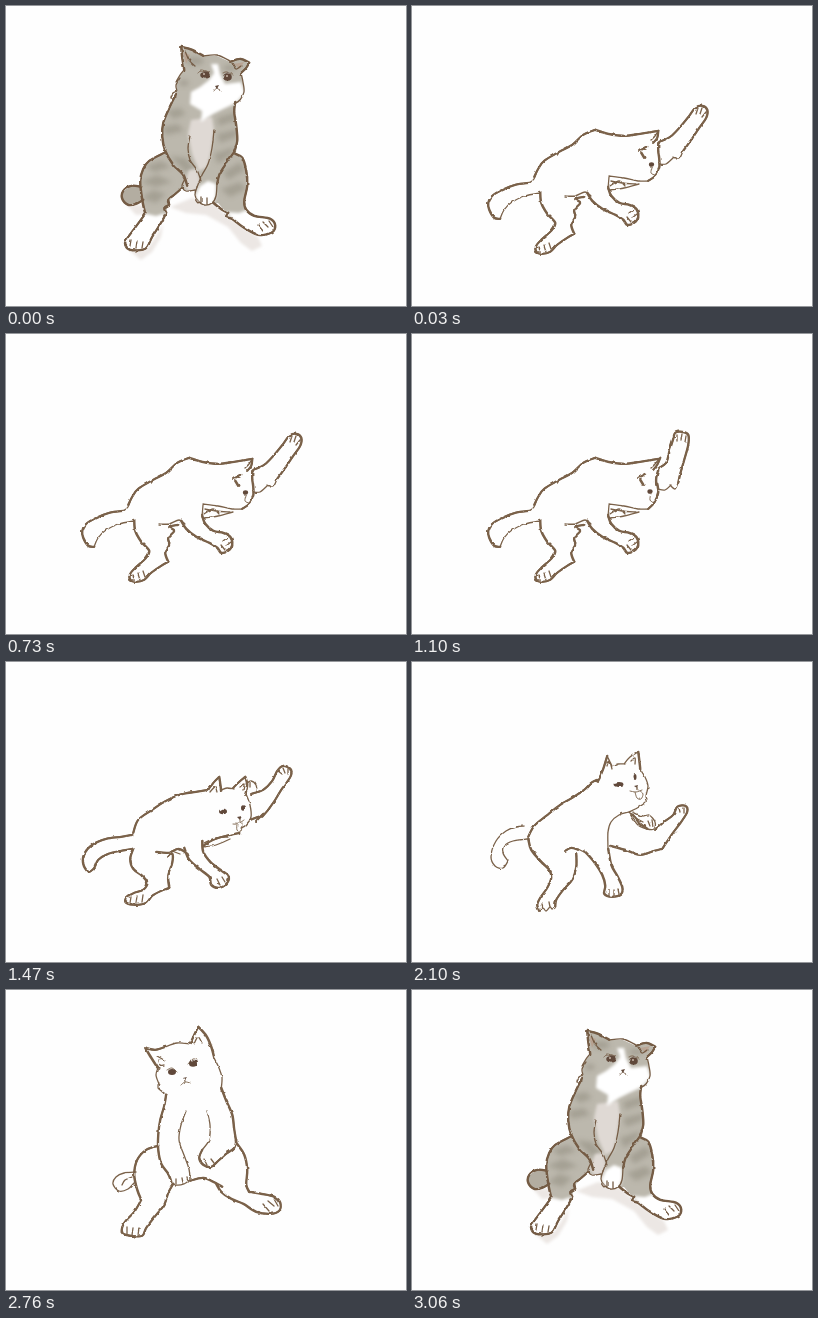
An HTML page for the animation above (4.33 s loop, 400 by 300 pixels).

```html
<!DOCTYPE html>
<html lang="en">
<head>
<meta charset="utf-8">
<title>Cat washing</title>
<style>
html, body { margin: 0; width: 100%; height: 100%; overflow: hidden; background: #fefefe; }
svg { display: block; width: 100vw; height: 100vh; }
.ink { fill: none; stroke: #7a6149; stroke-width: 1.3; stroke-linecap: round; stroke-linejoin: round; filter: url(#rough); }
.ink .bold { stroke-width: 1.9; }
.ink .fine { stroke-width: .9; }
.ink .dot { fill: #60483a; stroke: none; }
#sit .ink { stroke: #755c45; }
.pose { visibility: hidden; animation: 4330ms step-end infinite; }
#sit { animation-name: sit; }
#crouch { animation-name: crouch; }
#reach { animation-name: reach; }
#tuck { animation-name: tuck; }
#look { animation-name: look; }
#turn { animation-name: turn; }
#rise { animation-name: rise; }
#settle { animation-name: settle; }
/* stops: 30, 400, 730, 1100, 1470, 2100, 2430, 2760, 3060 ms */
@keyframes sit { 0%, 70.670% { visibility: visible } .693%, 100% { visibility: hidden } }
@keyframes crouch { 0%, 33.949%, 100% { visibility: hidden } .693% { visibility: visible } }
@keyframes reach { 0%, 9.238%, 25.404%, 100% { visibility: hidden } .693%, 16.859% { visibility: visible } }
@keyframes tuck { 0%, 16.859%, 33.949%, 100% { visibility: hidden } 9.238%, 25.404% { visibility: visible } }
@keyframes look { 0%, 48.499%, 100% { visibility: hidden } 33.949% { visibility: visible } }
@keyframes turn { 0%, 56.120%, 100% { visibility: hidden } 48.499% { visibility: visible } }
@keyframes rise { 0%, 63.741%, 100% { visibility: hidden } 56.120% { visibility: visible } }
@keyframes settle { 0%, 70.670%, 100% { visibility: hidden } 63.741% { visibility: visible } }
</style>
</head>
<body>
<svg viewBox="0 0 400 300">
<defs>
  <filter id="soft" x="-50%" y="-50%" width="200%" height="200%"><feGaussianBlur stdDeviation="2.4"/></filter>
  <filter id="shade" x="-50%" y="-50%" width="200%" height="200%"><feGaussianBlur stdDeviation="1.8"/></filter>
  <filter id="rough" filterUnits="userSpaceOnUse" x="0" y="0" width="400" height="300" color-interpolation-filters="sRGB">
    <feTurbulence type="fractalNoise" baseFrequency=".16" numOctaves="2" seed="4" result="grain"/>
    <feDisplacementMap in="SourceGraphic" in2="grain" scale="2.6" xChannelSelector="R" yChannelSelector="G"/>
  </filter>
  <clipPath id="coat">
    <path d="M175 41 186 44 197 50 211 50 224 56 234 53 243 57 240 62 235 67 237 76 238 86 234 94 229 97 228 106 230 120 231 135 230 147 236 152 240 165 241 180 238 195 240 204 248 210 264 213 269 220 265 227 252 229 238 222 226 213 212 197 206 198 197 199 191 192 188 185 180 184 175 183 165 192 161 203 156 215 146 231 139 243 124 244 119 238 128 223 139 208 136 194 134 175 137 163 143 155 158 147 156 131 157 118 164 99 171 86 170 76 174 69 178 64 176 52Z"/>
  </clipPath>
</defs>

<g class="pose" id="sit">
  <g fill="#ece7e4" filter="url(#shade)">
    <path d="M164 201 186 192 208 198 225 213 240 223 252 231 256 240 246 245 235 237 222 221 200 209 180 207Z"/>
    <path d="M120 198 138 199 139 208 130 209Z"/>
    <path d="M123 244 141 243 149 232 157 218 155 231 146 246 135 254Z"/>
  </g>
  <path fill="#b3ada1" d="M135 181 125 180 117 185 116 193 122 199 130 198 137 194Z"/>
  <g clip-path="url(#coat)">
    <rect x="110" y="35" width="165" height="215" fill="#bcb8ad"/>
    <g fill="#9a9588" opacity=".68" filter="url(#soft)">
      <ellipse cx="189" cy="55" rx="9" ry="4"/>
      <ellipse cx="224" cy="62" rx="7" ry="3"/>
      <ellipse cx="178" cy="77" rx="5" ry="3"/>
      <path d="M160 105 174 102 180 108 168 113Z"/>
      <path d="M156 121 172 118 178 125 160 129Z"/>
      <path d="M164 150 180 152 190 165 178 165Z"/>
      <path d="M211 112 230 106 230 114 213 120Z"/>
      <path d="M211 128 232 123 230 131 214 137Z"/>
      <path d="M208 148 228 141 226 148 212 158Z"/>
      <path d="M140 160 155 155 165 161 148 166Z"/>
      <path d="M135 176 151 169 166 176 150 181Z"/>
      <path d="M136 192 147 184 160 188 150 197Z"/>
      <path d="M217 166 234 156 239 164 222 174Z"/>
      <path d="M215 183 234 176 240 183 224 191Z"/>
    </g>
    <g fill="#dfd9d4" filter="url(#shade)">
      <path d="M185 114 206 111 208 124 205 146 201 161 193 165 186 148 182 128Z"/>
      <path d="M183 164 191 163 194 175 190 186 182 185 178 179Z"/>
    </g>
    <g fill="#fff" filter="url(#shade)">
      <path d="M205 58 212 58 214 68 219 78 235 76 239 87 230 97 217 103 207 108 195 116 196 105 184 98 185 86 194 81 203 74 208 67Z"/>
      <path d="M194 180 202 175 210 178 210 190 206 201 194 200 189 190Z"/>
      <path d="M137 207 150 210 159 207 157 223 145 246 116 246 119 230Z"/>
      <path d="M220 206 233 207 243 203 272 214 270 232 243 231Z"/>
    </g>
    <path fill="#b99a86" opacity=".6" d="M177 46 184 49 180 58Z M228 58 238 56 234 63Z"/>
  </g>
  <g class="ink">
    <path class="bold" d="M178 64 176 52 175 41M175 41 186 44 197 50M224 56 234 53 243 57M243 57 240 62 235 67"/>
    <path d="M197 50 211 49 224 55M179 45 183 54 189 60M226 57 230 63 235 60M178 64 174 69 170 76M174 72 170 79 171 85M171 85 167 87 165 92 170 91M235 67 237 76 238 86 234 94 228 98"/>
    <path class="bold" d="M170 88 164 100 157 117 156 131 159 145 167 159 177 169 181 180"/>
    <path class="bold" d="M229 96 228 106 230 120 231 135 228 146"/>
    <path class="bold" d="M228 146 219 159 213 169 211 178"/>
    <path d="M184 130 182 142 184 154 191 164 195 175M208 124 206 142 202 158 196 169 191 181"/>
    <path d="M179 173 176 180 180 185 189 184M191 181 189 189 192 195 198 199 206 197 210 190 211 177M195 191 195 197M201 192 201 198"/>
    <path class="bold" d="M158 147 143 155 137 163 134 175 136 194 139 208"/>
    <path class="bold" d="M139 208 128 223 120 234 119 239 124 244 139 243 146 231 156 215 160 207M160 207 158 202 163 199M163 199 162 194 168 189 176 182"/>
    <path class="bold" d="M229 148 236 152 240 165 241 180 238 195 240 204 248 210 264 213 269 220 265 227 252 229 238 222 226 213"/>
    <path class="bold" d="M226 213 220 211 222 207M222 207 216 204 207 197"/>
    <path d="M125 234 124 240M131 235 130 242M137 236 136 242M257 216 262 221M252 219 257 225M263 215 267 221"/>
    <path class="bold" d="M135 181 125 180 117 185 116 193 122 199 130 198 137 194"/>
    <path class="fine" d="M208 85 211 82 214 85M192 67 196 64 203 66M217 67 222 66 227 69"/>
    <ellipse class="dot" cx="199" cy="69" rx="4.800" ry="3.700"/>
    <ellipse class="dot" cx="221.500" cy="71" rx="4.300" ry="3.800"/>
    <path class="dot" d="M209 80 213 79 211 83Z"/>
  </g>
  <g fill="#c9b9ad"><circle cx="198" cy="68" r="1"/><circle cx="221" cy="70" r="1"/></g>
</g>

<g class="pose" id="crouch">
  <g class="ink">
    <path class="bold" d="M88 213 82 212 77 204 76 197 80 190 90 184 103 179 117 177M122 171 126 163 132 155 147 146 160 139 171 129 183 124"/>
    <path class="bold" d="M183 124 196 128 212 130 228 128 246 125"/>
    <path d="M88 213 92 204 100 196 113 190 128 187M117 177 122 173 125 165"/>
    <path class="bold" d="M128 186 129 197 135 208 143 217 139 225 130 233 124 240 124 246 130 248 138 246 145 239 155 232 162 228"/>
    <path class="bold" d="M162 228 159 219 163 211 162 204 168 197 163 193 172 191"/>
    <path d="M153 190 163 190 173 186 179 190"/>
    <path class="bold" d="M175 187 180 195 190 203 203 209 211 214 215 219 222 217 226 211 224 203 217 199 207 197 199 190 196 182"/>
    <path d="M127 241 128 246M132 240 134 246M137 237 139 243M222 203 217 207M225 208 220 212M215 211 219 216"/>
  </g>
</g>

<g class="pose" id="tuck">
  <g class="ink">
    <path class="bold" d="M248 124 245 131 241 136M246 136 244 144 244 151M245 150 246 159 242 169 236 175"/>
    <path d="M239 134 243 130 247 125M236 175 226 175 212 172 197 170M197 171 196 183M197 184 212 182 227 178M199 175 210 177 224 178M198 180 207 175 213 180"/>
    <path class="bold" d="M226 144 234 140M228 146 231 151"/>
    <path class="bold" d="M247 134 254 129 257 118 261 105 263 99 270 98 276 101 276 111 272 126 268 140 266 149"/>
    <path d="M266 149 263 155 258 151M259 151 253 156 246 155M265 101 265 107M270 100 269 106M274 102 273 108"/>
    <ellipse class="dot" cx="238" cy="157.500" rx="2.600" ry="2.300"/>
    <path class="fine" d="M239 159 238 166 242 169"/>
  </g>
</g>

<g class="pose" id="reach">
  <g class="ink">
    <path class="bold" d="M246 125 245 132 241 137M246 137 246 145 247 153 247 162 243 170 236 175"/>
    <path d="M239 134 243 130 246 125M236 175 226 175 212 172 197 170M197 171 196 183M197 184 212 182 227 178M199 175 210 177 224 178M198 180 207 175 213 180"/>
    <path class="bold" d="M227 145 235 141M229 147 232 152"/>
    <path class="bold" d="M247 136 258 131 268 121 277 110 283 102 290 100 295 104 294 112 287 122 279 134 271 145"/>
    <path d="M271 145 267 153 261 151M261 152 254 158 247 158M286 102 284 108M290 102 288 108M294 106 290 111"/>
    <ellipse class="dot" cx="239.500" cy="158.500" rx="2.600" ry="2.300"/>
    <path class="fine" d="M240 161 239 167 243 169"/>
  </g>
</g>

<g class="pose" id="look">
  <g class="ink">
    <path class="bold" d="M127 171 132 158 146 148 158 140 173 133 190 130 202 128M126 173 115 175 100 177 86 183 78 192 77 202 82 210 88 206 92 198 102 192 115 189 127 187"/>
    <path class="bold" d="M201 129 208 120 213 115M213 115 214 122 215 129M227 126 233 120 239 115M239 115 241 123 239 133"/>
    <path d="M204 130 209 125 211 130M215 128 221 126 228 127M234 125 238 122 237 128M240 132 244 143 245 155 240 163 235 166"/>
    <path class="bold" d="M234 171 220 174 207 178 197 184"/>
    <path d="M198 181 210 176 222 175M197 185 210 183 224 177"/>
    <path class="bold" d="M245 132 257 128 266 119 271 109 277 104 284 107 285 113 281 120 275 128 269 138 262 148"/>
    <path class="bold" d="M262 148 256 155M257 152 250 159M252 155 244 158"/>
    <path d="M240 122 245 119 250 123 251 130M244 121 244 125M272 109 276 112M277 106 279 111M282 107 282 112"/>
    <path class="bold" d="M127 187 124 197 127 207 136 214 141 221 137 228 128 231 120 236 120 241 130 243 140 241 146 234 155 229 163 226"/>
    <path class="bold" d="M163 226 162 214 166 201 166 192 162 195M150 190 162 191 172 187 180 191"/>
    <path d="M166 189 174 192"/>
    <path class="bold" d="M178 186 183 198 193 207 203 215 205 223 213 226 221 221 222 214 214 208 204 200 197 190 196 179"/>
    <path d="M125 235 124 241M131 234 130 241M137 233 136 240M216 215 219 220M211 217 214 223"/>
    <ellipse class="dot" cx="217" cy="149.500" rx="4" ry="2.700"/>
    <ellipse class="dot" cx="237" cy="146" rx="2" ry="2.800"/>
    <path class="dot" d="M231 155 236 154 234 158Z"/>
    <path class="fine" d="M234 157 234 161M227 161 233 161 238 158M231 162 231 168 235 170 236 161"/>
  </g>
</g>

<g class="pose" id="turn">
  <g class="ink">
    <path class="bold" d="M187 117 179 121 172 128 160 136 148 143 134 154 122 164 116 175"/>
    <path d="M113 164 104 165 94 169 84 179 79 194 83 204 91 206 96 199M96 199 91 191 92 184 101 179 115 177"/>
    <path class="bold" d="M186 119 191 107 195 94M226 90 227 98 228 107"/>
    <path d="M195 94 198 100 200 107M195 104 197 99 200 104M202 104 206 102 213 102M212 102 218 95 226 90M219 99 223 96 223 102M228 107 233 115 236 124 234 134 235 139 227 145 217 150"/>
    <path d="M217 150 207 153 199 160 196 170 196 187M217 150 224 156 231 160M221 150 230 154 237 153 243 160 242 167 235 167 226 163 218 152"/>
    <path class="bold" d="M220 152 227 161 235 167M198 184 213 188 228 193 242 189 250 187"/>
    <path class="bold" d="M250 187 260 172 269 160 275 150 273 144 265 145 261 153 252 160 243 168"/>
    <path d="M267 146 268 150M272 146 272 151M236 159 238 164M240 158 241 164"/>
    <path class="bold" d="M116 177 119 188 129 200 137 208 139 216 135 226 128 236 125 243 127 249M143 245 144 238 151 228 160 218 164 205 164 192"/>
    <path d="M127 249 131 246 134 249 138 245 140 247 143 245M130 242 131 246M137 240 138 245M166 187 172 190"/>
    <path class="bold" d="M153 189 159 186 166 188M172 189 181 199 190 213 193 224 192 232 200 235 209 232 210 225 205 214 199 203 196 187"/>
    <path d="M197 228 197 233M202 228 202 234M206 227 207 232"/>
    <ellipse class="dot" cx="207" cy="122.500" rx="4.400" ry="2.400"/>
    <ellipse class="dot" cx="223" cy="115" rx="1.500" ry="3"/>
    <path class="dot" d="M222 124 226 123 225 126Z"/>
    <path class="fine" d="M225 125 226 128M218 129 224 130 230 128M223 130 225 136 229 137 231 132 228 129"/>
  </g>
</g>

<g class="pose" id="rise">
  <g class="ink">
    <path class="bold" d="M162 75 165 64 168 56M168 56 175 60 181 66M197 64 205 55 212 49M212 49 216 59 217 71"/>
    <path d="M169 70 170 62 176 68M181 66 189 63 198 64M206 62 210 57 212 66M162 75 160 84 163 94 169 102M217 71 221 82 222 93 217 102 211 107"/>
    <path class="bold" d="M168 102 158 115 148 130 139 145 133 160 129 173"/>
    <path class="bold" d="M217 103 223 117 227 132 228 146 224 157"/>
    <path d="M130 173 116 171 102 174 90 181 83 190 84 199 91 203 96 197 101 190 113 186 130 186"/>
    <path class="bold" d="M129 173 126 186 130 198 136 208 132 220 124 231 120 241 125 247M142 245 144 236 152 225 160 214 163 202 167 193"/>
    <path d="M125 247 133 248 142 245M127 240 127 245M133 240 133 246M138 239 139 244"/>
    <path class="bold" d="M160 128 158 145 162 162 169 180 174 195 175 206 183 209 192 206 192 197 187 183 183 168 184 152 188 137"/>
    <path d="M179 202 180 207M185 202 186 207M191 194 201 191 212 195"/>
    <path d="M205 130 208 145 208 158 206 168 209 177 218 179 226 174 229 163 227 154M212 172 214 177M219 172 221 176"/>
    <path class="bold" d="M228 149 237 163 241 178 247 184 258 180 269 174 278 173 285 180 281 188 270 194 256 202 240 207 225 205 212 196"/>
    <path d="M274 177 279 182M270 180 275 186M280 177 283 183"/>
    <ellipse class="dot" cx="180" cy="86" rx="4.300" ry="3"/>
    <ellipse class="dot" cx="204" cy="80" rx="3.500" ry="3"/>
    <path class="dot" d="M194 91 199 90 197 93Z"/>
    <path class="fine" d="M197 93 197 96M190 98 197 96 203 95"/>
  </g>
</g>

<g class="pose" id="settle">
  <g class="ink">
    <path class="bold" d="M139 58 149 60 159 57M139 58 145 68 152 79M184 54 188 45 192 37M192 37 200 46 205 57 208 68"/>
    <path d="M151 66 158 70M153 70 154 75 158 75M159 57 171 53 184 54M188 54 192 47 196 53M152 78 150 85 153 94M153 93 152 98 157 102 161 104M208 68 213 78 216 88 215 100"/>
    <path class="bold" d="M160 104 158 116 154 130 152 145 152 160 155 174 162 184 165 192"/>
    <path class="bold" d="M215 98 220 111 226 125 228 140 230 152"/>
    <path d="M180 121 175 135 173 150 178 165 183 179 184 190M165 192 170 195 178 194 184 190M170 189 170 194M176 188 177 193M181 187 182 191"/>
    <path d="M201 121 204 135 203 150 196 160"/>
    <path class="bold" d="M196 160 193 168 197 175 205 177 212 171 220 164 228 158 230 150"/>
    <path d="M198 169 201 175M205 169 208 173"/>
    <path class="bold" d="M152 156 140 160 131 170 128 185 131 200 135 210"/>
    <path class="bold" d="M135 210 128 222 118 233 116 243 125 246 136 246 140 238 150 225 158 215 162 203 167 194"/>
    <path class="bold" d="M230 153 238 165 241 180 240 195 243 202M184 191 197 188 209 193 216 197"/>
    <path class="bold" d="M243 202 255 204 268 207 274 213 273 221 264 224 250 222 237 214 225 209 215 202 210 194"/>
    <path d="M121 238 121 244M127 238 126 245M133 238 132 245M262 211 268 216M257 214 263 221M268 209 272 216"/>
    <path d="M130 182 118 183 110 187 107 194 113 201 122 199 128 193M116 195 119 190 126 187"/>
    <path class="fine" d="M161 80 166 78 171 82M182 74 187 69 191 70"/>
    <ellipse class="dot" cx="166" cy="82" rx="4" ry="3"/>
    <ellipse class="dot" cx="187" cy="73.500" rx="4" ry="3.300"/>
    <path class="dot" d="M177 88 181 87 179 90Z"/>
    <path class="fine" d="M179 89 179 92M175 95 179 92 184 93"/>
  </g>
</g>
</svg>
<script>
// Round each run of points into a Catmull-Rom curve.
function smooth(run) {
  const n = run.match(/[\d.]+/g).map(Number);
  const p = [];
  for (let i = 0; i < n.length; i += 2) p.push([n[i], n[i + 1]]);
  const at = i => p[Math.max(0, Math.min(p.length - 1, i))];
  let d = `M${p[0]}`;
  for (let i = 0; i < p.length - 1; i++) {
    const [a, b, c, e] = [at(i - 1), at(i), at(i + 1), at(i + 2)];
    const c1 = b.map((v, k) => v + (c[k] - a[k]) / 6);
    const c2 = c.map((v, k) => v - (e[k] - b[k]) / 6);
    d += `C${c1} ${c2} ${c}`;
  }
  return d;
}

// A second, shifted pass gives the heavy strokes a brush-like weight.
document.querySelectorAll('.ink path:not(.dot)').forEach(path => {
  const runs = path.getAttribute('d').split('M').slice(1);
  path.setAttribute('d', runs.map(smooth).join(''));
  if (!path.matches('.bold')) return;
  const echo = path.cloneNode();
  echo.setAttribute('transform', 'translate(.5 -.4)');
  path.after(echo);
});
</script>
</body>
</html>
```
